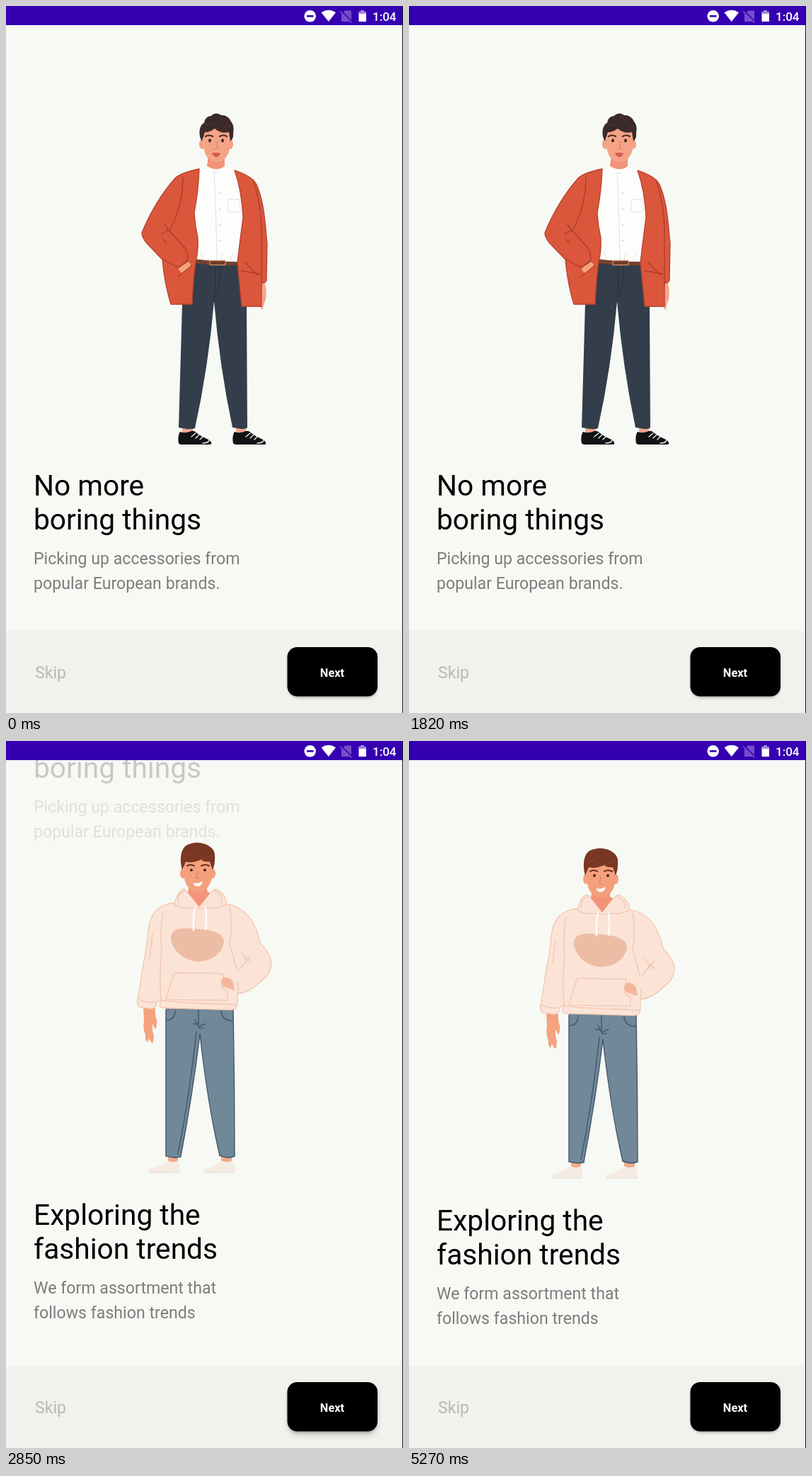
These frames come from a looping animation (561 px wide and 998 px high, 5.39 s). An HTML page:

```html
<!DOCTYPE html>
<html lang="en">
<head>
<meta charset="utf-8">
<title>Onboarding</title>
<style>
html, body { margin: 0; width: 100%; height: 100%; overflow: hidden; background: #f7f9f4; }
svg { display: block; width: 100vw; height: 100vh; font-family: Roboto, "Open Sans", sans-serif; }
.title { font-size: 40.7px; fill: #000; }
.sub { font-size: 23.15px; fill: #7d7d7d; }
.line { fill: none; stroke-linecap: round; stroke-linejoin: round; }

/* 5390 ms loop: the press starts at 2640, the page turns from 2710 to 3310 */
.leave { animation: leave 5390ms infinite; }
.enter { animation: enter 5390ms infinite, appear 5390ms linear infinite; }
.lift { animation: lift 5390ms linear infinite; }
@keyframes leave {
  0% { transform: translateY(0); opacity: 1; }
  50.3% { transform: translateY(0); opacity: 1; animation-timing-function: cubic-bezier(.16, 1, .3, 1); }
  61.41%, 100% { transform: translateY(-854px); opacity: 0; }
}
@keyframes enter {
  0% { transform: translateY(-40px); }
  50.3% { transform: translateY(-40px); animation-timing-function: cubic-bezier(.16, 1, .3, 1); }
  61.41%, 100% { transform: translateY(0); }
}
@keyframes appear {
  0% { opacity: 0; }
  50.3% { opacity: 0; animation-timing-function: ease-out; }
  52.69%, 100% { opacity: 1; }
}
@keyframes lift {
  0%, 48.6% { opacity: 0; }
  49.3%, 51.4% { opacity: 1; }
  53.6%, 100% { opacity: 0; }
}
</style>
</head>
<body>
<svg viewBox="0 0 561 998" preserveAspectRatio="none">
  <defs>
    <filter id="blur" x="-20%" y="-30%" width="140%" height="170%"><feGaussianBlur stdDeviation="2.2"/></filter>
    <filter id="blurWide" x="-20%" y="-30%" width="140%" height="170%"><feGaussianBlur stdDeviation="4"/></filter>
    <clipPath id="pane"><rect y="27" width="561" height="855"/></clipPath>
    <path id="shoe" d="M3 2 C0 6 0 14 1 18 Q2 20 6 20 L45 20 Q48 20 47 17 C45 12 35 11 27 4 Q23 0 19 1 Q10 5 3 2Z"/>
  </defs>

  <rect width="561" height="998" fill="#f7f9f4"/>

  <g clip-path="url(#pane)">
    <g class="enter">
      <!-- hand on the left -->
      <path d="M194 383 L211 385 Q210 394 213 402 Q214 410 211 415 L207 407 Q206 415 209 424 L208 434 Q205 435 202 427 L200 433 Q196 430 197 423 Q193 414 195 403Z" fill="#f5a27e"/>
      <!-- feet -->
      <path d="M229 592H243V604H229ZM304 592H319V604H304Z" fill="#f2a88c"/>
      <path d="M229 600 Q236 604 243 600 Q246 607 245 616 L203 617 Q200 616 203 612 Q219 608 229 600ZM304 600 Q312 604 320 600 Q324 608 323 616 L280 617 Q277 616 280 612 Q295 609 304 600Z" fill="#f4ebe3"/>
      <path class="line" d="M203 617H245M280 617H323" stroke="#e9dacf" stroke-width="1"/>
      <!-- jeans -->
      <path d="M226 380 L321 382 Q323 480 323 593 Q322 596 314 596 L302 594 Q286 520 274 421 Q264 505 247 594 Q244 597 237 596 L226 594Z" fill="#718899"/>
      <g class="line" stroke="#42566a" stroke-width="1.4">
        <path d="M226 387V594M321 387Q323 490 323 594M227 594Q237 597 247 595M302 593Q314 598 323 594"/>
        <path d="M274 421Q264 505 247 594M269 418Q260 505 243 591M274 421Q285 520 302 593"/>
        <path d="M272 386V408L264 407M272 411L282 407M267 401L273 413 279 413"/>
        <path d="M239 388Q239 401 227 402M304 388Q304 402 320 403"/>
      </g>
      <!-- hoodie -->
      <g fill="#fbe3d6" stroke="#f1c4ae" stroke-width="1.2" stroke-linejoin="round">
        <path d="M239 236 C213 239 203 253 201 276 Q199 300 194 322 Q190 350 186 373 Q184 383 192 384 L206 386 Q213 384 213 377 L219 372 L217 382 Q219 385 230 385 L318 387.5 Q326 387 327 379 L327 365 Q346 362 358 349 Q375 337 375 320 Q374 309 359 293 C353 263 338 242 311 238Z"/>
        <path d="M252 217 Q242 219 238 239 Q251 246 267 243 Q275 247 283 243 Q300 246 312 238 Q309 220 295 217 L273 236Z"/>
      </g>
      <g class="line" stroke="#f1c4ae" stroke-width="1.2">
        <path d="M219 372Q216 340 220 302Q217 275 222 249M218 374Q255 378 327 380M316 242Q321 270 316 294L326 330"/>
        <path d="M333 306Q337 312 340 322M346 311L328 332M340 314L347 321M187 372Q200 379 213 376M244 236Q240 225 253 219M305 236Q307 225 294 219"/>
        <path d="M238 335L306 336Q309 346 304 355L313 362 313 374 226 373Q233 348 238 335Z"/>
        <path d="M327 349Q330 352 327 365M207 280L203 315"/>
      </g>
      <path d="M306 342 Q316 339 321 348 L323 360 L306 354 Q302 349 306 342Z" fill="#f5b79c"/>
      <path d="M233 284 C235 271 250 271 268 273 C290 274 308 278 308 292 C305 308 290 319 271 319 C252 318 233 303 233 284Z" fill="#ecbca4"/>
      <!-- neck and head -->
      <path d="M259 207 L284 207 V219 L288 223 L273 242 L257 222Z" fill="#f3947a"/>
      <ellipse cx="250" cy="195" rx="4" ry="7" fill="#f5a07c"/>
      <ellipse cx="292" cy="195" rx="4" ry="7" fill="#f5a07c"/>
      <path d="M251 171 H292 V196 C290 212 282 221 271 221 C260 221 253 212 251 196Z" fill="#f5a07c"/>
      <path d="M249 190 C244 172 248 155 260 153 C274 148 294 155 295 168 Q296 181 292 190 L288 178 Q279 179 276 175 Q263 181 254 178Z" fill="#783623"/>
      <path class="line" d="M255 170Q265 167 269 162M276 174Q286 174 291 168" stroke="#8b472f" stroke-width="1"/>
      <path class="line" d="M256 184Q261 181 266 184M276 184Q281 181 287 184" stroke="#632b1d" stroke-width="2"/>
      <circle cx="262" cy="190" r="1.9" fill="#34211c"/><circle cx="281" cy="190" r="1.9" fill="#34211c"/>
      <path class="line" d="M271 192L269 201 273 202" stroke="#dd8059" stroke-width="1.2"/>
      <path d="M264 208 Q271 210 278 206 Q276 214 269 213 Q266 212 264 208Z" fill="#fff"/>
      <path class="line" d="M267 243Q264 258 265 275M282 243Q284 259 282 274" stroke="#fffdfa" stroke-width="2.3"/>

      <text class="title" x="39" y="691">Exploring the</text>
      <text class="title" x="39" y="739">fashion trends</text>
      <text class="sub" x="39" y="788">We form assortment that</text>
      <text class="sub" x="39" y="823">follows fashion trends</text>
    </g>

    <g class="leave">
      <!-- feet -->
      <path d="M249 594H264V606H249ZM325 594H339V606H325Z" fill="#f0a68e"/>
      <use href="#shoe" x="243" y="599" fill="#101316"/>
      <use href="#shoe" x="320" y="599" fill="#101316"/>
      <path class="line" d="M262 608L268 603M268 610L273 605M274 612L278 608M278 617Q286 617 287 613M339 608L345 603M345 610L350 605M351 612L355 608M355 617Q363 617 364 613" stroke="#eee" stroke-width="1.4"/>
      <!-- trousers -->
      <path d="M262 362 L334 362 L340 424 L341 595 Q340 597 332 597 L320 595 Q302 510 294 417 Q286 510 267 596 Q263 598 255 597 L244 595 L249 420Z" fill="#333e4a"/>
      <path class="line" d="M295 367Q297 393 294 417M303 368Q304 398 295 411" stroke="#242d37" stroke-width="1"/>
      <!-- shirt -->
      <path d="M271 233 Q284 226 297 231 Q312 226 325 234 L337 300 L327 362 L267 358 L264 300Z" fill="#fdfefc"/>
      <g class="line" stroke="#dfe1df" stroke-width="1">
        <path d="M294 235Q297 290 298 359M283 229Q289 239 294 235M309 230Q303 239 296 235M275 346L279 358M320 350L316 360M306 350L303 360"/>
        <rect x="314" y="273" width="17" height="18" rx="2"/>
      </g>
      <g fill="#d8d5de">
        <circle cx="302" cy="264" r="1.2"/><circle cx="302" cy="287" r="1.2"/>
        <circle cx="302" cy="309" r="1.2"/><circle cx="302" cy="331" r="1.2"/>
      </g>
      <!-- belt -->
      <path d="M266 357 Q298 361 328 361 V366 Q295 367 266 363Z" fill="#76402f"/>
      <rect x="288" y="359.5" width="22" height="6" rx="1" fill="#6e382b" stroke="#c88962" stroke-width="1.4"/>
      <!-- right hand side -->
      <path d="M360 389 L366 391 Q369 404 367 414 Q364 420 363 428 Q359 430 360 420Z" fill="#f5a68c"/>
      <g fill="#da573b" stroke="#b8402f" stroke-width="1.3" stroke-linejoin="round">
        <path d="M323 232 Q348 240 354 252 C365 277 366 305 369 336 L368 387 Q367 391 361 391 L361 424 L333 424 L327 362 Q330 336 335 298 Q333 260 323 232Z"/>
        <path d="M273 230 Q248 235 239 243 C217 268 202 296 192 320 Q192 327 199 335 L221 358 Q224 392 233 421 L263 421 Q264 390 268 361 Q272 347 271 327 Q267 310 266 292 Q272 260 273 230Z"/>
      </g>
      <g class="line" stroke="#ad3b2e" stroke-width="1.3">
        <path d="M250 242Q250 282 231 317M220 322L230 316 254 343Q258 352 256 361L246 370Q232 364 221 357M223 307L231 318M227 334L221 329"/>
        <path d="M349 245Q360 277 361 312V391M338 362L355 380M333 374L359 378"/>
      </g>
      <path d="M243 371 L257 361 Q263 364 260 369 L249 378Z" fill="#f4a478"/>
      <path class="line" d="M243 382L262 367M242 370L257 359" stroke="#ad3b2e" stroke-width="1.3"/>
      <!-- neck and head -->
      <path d="M286 209 L309 209 V226 Q298 235 284 226Z" fill="#f0937a"/>
      <path d="M283 226 Q297 235 310 226 L314 233 L304 238 L296 232 L287 239 L280 233Z" fill="#fdfefc"/>
      <ellipse cx="277" cy="195" rx="4" ry="7" fill="#f5a386"/>
      <ellipse cx="317" cy="195" rx="4" ry="7" fill="#f5a386"/>
      <path d="M279 172 H317 V197 C315 212 308 220 297 220 C287 220 280 211 279 197Z" fill="#f5a386"/>
      <path d="M277 191 C271 182 273 168 280 165 Q281 156 290 155 Q296 149 304 154 Q314 154 318 163 Q323 169 321 180 Q322 187 317 191 L315 178 Q304 181 295 173 Q287 179 281 178Z" fill="#3c2a2a"/>
      <path class="line" d="M281 166Q287 171 294 166M299 158Q306 158 307 165M311 165Q317 169 315 173" stroke="#50383a" stroke-width="1"/>
      <path class="line" d="M282 184Q287 181 292 184M302 184Q307 181 312 184" stroke="#3b2928" stroke-width="2.2"/>
      <ellipse cx="288" cy="190" rx="1.8" ry="2.4" fill="#281f21"/><ellipse cx="306" cy="190" rx="1.8" ry="2.4" fill="#281f21"/>
      <path class="line" d="M298 191L299 201 295 202" stroke="#d87c64" stroke-width="1.2"/>
      <path d="M291 208 Q297 206 303 208 Q301 214 296 213 Q293 212 291 208Z" fill="#d35d4f"/>

      <text class="title" x="39" y="691">No more</text>
      <text class="title" x="39" y="739">boring things</text>
      <text class="sub" x="39" y="788">Picking up accessories from</text>
      <text class="sub" x="39" y="823">popular European brands.</text>
    </g>
  </g>

  <!-- bottom bar -->
  <rect y="882" width="561" height="116" fill="#f0f2ee"/>
  <text x="41" y="949" font-size="23.15" fill="#b7b9b5">Skip</text>
  <rect x="399" y="908" width="125" height="68" rx="14" fill="#000" opacity=".32" filter="url(#blur)"/>
  <g class="lift">
    <rect x="398" y="912" width="127" height="69" rx="14" fill="#000" opacity=".35" filter="url(#blurWide)"/>
  </g>
  <rect x="397.5" y="905" width="127.5" height="69.5" rx="14" fill="#000"/>
  <text x="461" y="947" font-size="16.4" font-weight="700" fill="#fff" text-anchor="middle">Next</text>

  <!-- status bar -->
  <rect width="561" height="27" fill="#3500b2"/>
  <circle cx="429.7" cy="14.3" r="8.3" fill="#fff"/>
  <rect x="425" y="13" width="9.5" height="2.6" fill="#3500b2"/>
  <path d="M445.5 9.2 Q456 2.5 466 9.2 L455.8 22Z" fill="#fff"/>
  <path d="M479 6.5 H488 V22 H474 V11.5Z" fill="#7350cb"/>
  <path class="line" d="M473 7L488.5 22.5" stroke="#3500b2" stroke-width="3"/>
  <path class="line" d="M472.5 8L488 23" stroke="#7c5bd0" stroke-width="1.5"/>
  <path d="M498.5 8 H501.5 V6 H506 V8 H509 V22 H498.5Z" fill="#fff"/>
  <path d="M498.5 8 H501.5 V6 H506 V8 H509 V11 H498.5Z" fill="#a58ade"/>
  <text x="518" y="20.5" font-size="17" font-weight="500" fill="#fff">1:04</text>

  <rect x="560" width="1" height="998" fill="#111"/>
</svg>
</body>
</html>
```
